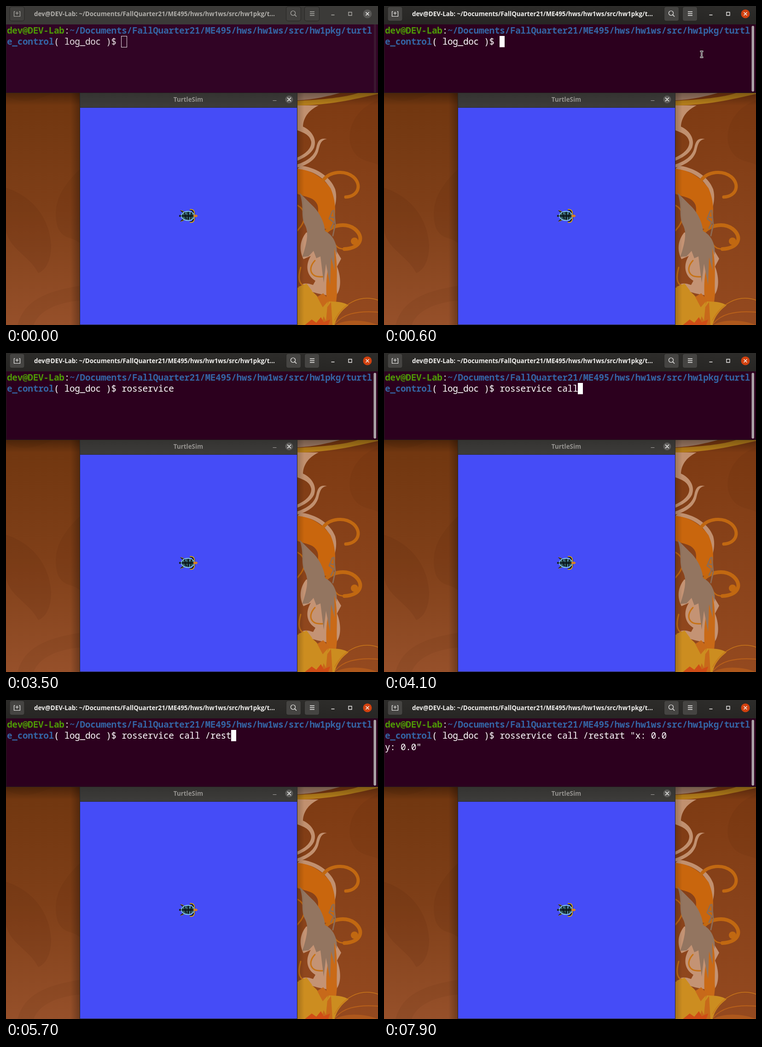
Write an HTML page with a canvas that moves like this. It is 808 px wide and 693 px high and loops after 8000 ms.

```html
<!DOCTYPE html>
<html lang="en">
<head>
<meta charset="utf-8">
<title>Terminal and TurtleSim</title>
<style>
html, body { margin: 0; width: 100%; height: 100%; overflow: hidden; background: #834018; }
canvas { display: block; }
</style>
</head>
<body>
<canvas id="stage" width="808" height="693"></canvas>
<script>
const W = 808, H = 693, LOOP = 8000;
const CELL = 11.33, LINE = 24.4;
const MONO = '"Noto Sans Mono", "DejaVu Sans Mono", monospace';
const TITLE_FONT = 'bold 13.4px "Open Sans", "Noto Sans", sans-serif';
const USER = 'dev@DEV-Lab';
const PATH = '~/Documents/FallQuarter21/ME495/hws/hw1ws/src/hw1pkg/turtl';
const BRANCH = '( log_doc )$ ';
const ctx = document.getElementById('stage').getContext('2d');

// [time, typed text, cursor visible]
const typing = [
  [0, '', 1], [1100, '', 0], [1300, 'ro', 1], [1700, 'ros', 1], [2200, 'ross', 1],
  [2700, 'rosse', 1], [2900, 'rosservice ', 1], [3500, 'rosservice ', 0],
  [3600, 'rosservice ', 1], [3800, 'rosservice ca', 1], [3900, 'rosservice cal', 1],
  [4100, 'rosservice call', 1], [4400, 'rosservice call ', 1], [4600, 'rosservice call /', 1],
  [4900, 'rosservice call /r', 1], [5100, 'rosservice call /re', 1],
  [5500, 'rosservice call /res', 1], [5700, 'rosservice call /rest', 1],
  [6300, 'rosservice call /rest', 0], [6400, 'rosservice call /rest', 1],
  [6800, 'rosservice call /restart ', 1], [7000, 'rosservice call /restart ', 0],
  [7300, 'rosservice call /restart ', 1],
  [7900, 'rosservice call /restart "x: 0.0\ny: 0.0"', 0]
];

// [time, x, y, shape]
const pointer = [
  [0, 0, 0, ''], [300, 793, 242, 'arrow'], [400, 638, 103, 'beam'],
  [600, 690, 105, 'beam'], [1300, 0, 0, '']
];

const at = (steps, t) => steps.reduce((cur, s) => (s[0] <= t ? s : cur));

function box(g, color, x, y, w, h, r = 0) {
  g.fillStyle = color;
  g.beginPath();
  g.roundRect(x, y, w, h, r);
  g.fill();
}

function disc(g, color, x, y, rx, ry = rx) {
  g.fillStyle = color;
  g.beginPath();
  g.ellipse(x, y, rx, ry, 0, 0, 7);
  g.fill();
}

function fill(g, color, d) {
  g.fillStyle = color;
  g.fill(new Path2D(d));
}

function line(g, color, width, d) {
  g.strokeStyle = color;
  g.lineWidth = width;
  g.stroke(new Path2D(d));
}

function fade(g, x0, y0, x1, y1, ...colors) {
  const grad = g.createLinearGradient(x0, y0, x1, y1);
  colors.forEach((c, i) => grad.addColorStop(i / (colors.length - 1), c));
  return grad;
}

function drawWallpaper(g) {
  box(g, fade(g, 0, 189, 0, H, '#70360f', '#7f3f18', '#96502a'), 0, 0, 161, H);
  box(g, fade(g, 0, 189, 0, H, '#7d3a12', '#88421a', '#94491f'), 632, 0, 176, H);

  // faint leaves
  fill(g, 'rgba(70,25,5,.1)', 'M0 395C50 410 95 455 98 520C98 555 85 575 70 580C50 540 0 525 0 480Z');
  fill(g, 'rgba(70,25,5,.09)', 'M160 355C125 390 98 425 112 480C125 510 145 500 160 515Z');
  fill(g, 'rgba(70,25,5,.08)', 'M0 195C35 215 65 205 100 190H0ZM25 693C40 640 85 620 160 608V640C105 645 70 665 60 693Z');
  fill(g, 'rgba(70,25,5,.08)', 'M808 205C765 220 740 260 748 300C760 340 790 335 808 345Z');

  // pale stems
  fill(g, '#a5806a', 'M633 189H725C700 196 670 203 633 205Z');
  fill(g, '#b8801b', 'M633 206C690 203 735 199 765 189H808V191C755 203 700 216 633 216Z');
  fill(g, '#c1906f', 'M633 216H679C660 225 646 240 645 262C665 271 676 290 669 308C662 322 647 330 633 336V329C651 321 664 309 663 295C660 278 642 274 633 270Z');
  fill(g, '#c1906f', 'M697 289C683 291 682 301 678 316C671 337 651 346 633 351V344C654 337 670 326 674 308C677 293 682 286 697 289Z');
  fill(g, '#c1906f', 'M640 347C671 350 704 369 715 398C719 413 717 427 713 440C715 412 703 381 672 365C659 358 645 356 633 354Z');

  // orange plume and curls
  fill(g, '#c9660d', 'M633 354C664 356 690 374 705 396C715 420 718 444 712 475C704 490 689 486 681 474C672 456 684 440 673 426C664 414 648 415 633 408Z');
  g.lineCap = 'round';
  line(g, '#c16811', 7, 'M689 378C704 359 735 356 754 371C773 387 767 413 738 415');
  line(g, '#c16811', 8, 'M690 497C704 475 738 470 757 484C779 501 772 526 735 528');
  line(g, '#c16811', 3, 'M735 528C720 528 716 520 711 513');
  disc(g, '#c16811', 757, 511, 8);
  line(g, '#c16811', 3, 'M633 433C650 442 653 460 641 478L633 488M668 559C656 573 665 590 680 588');

  // lower trunk
  fill(g, '#c49374', 'M652 492C638 510 636 530 646 550L662 543C650 562 652 585 672 597L667 606C651 600 640 602 641 612C662 622 691 629 716 630C730 615 727 585 719 566L728 549L716 529L690 495Z');
  line(g, '#c67216', 3, 'M671 553C655 570 660 591 689 588M650 608C634 606 635 587 640 568');
  fill(g, '#c96a17', 'M711 519C723 552 717 600 719 625L712 693H695C701 650 690 612 700 570Z');
  fill(g, '#937560', 'M637 405L664 432C681 447 692 471 693 489C714 499 721 524 718 541L713 526L714 575L706 546L704 606L695 560L690 601L683 544L674 548L668 532L657 544L644 545C651 520 660 495 649 475C639 455 649 435 637 405Z');
  line(g, '#8c6b55', 3, 'M709 445L702 462L712 470L706 483M712 444L715 475L710 499M704 458L713 460');

  // bottom sweep
  fill(g, '#cc8d20', 'M633 612C655 609 669 621 683 639C700 645 724 638 744 650C729 662 718 674 714 693H633Z');
  fill(g, '#c7691a', 'M689 624L702 639L695 658L706 643L709 693H684L693 664L676 632Z');
  fill(g, '#cc8d20', 'M699 642L695 684L683 660ZM635 610L653 603L665 619L650 631Z');
  fill(g, '#cf4d16', 'M649 693L664 681L674 688L684 676L690 687L704 681L700 693Z');
  line(g, '#c77419', 1.5, 'M714 682C731 649 767 625 808 639');
  line(g, '#b9601a', 2, 'M715 690C731 671 758 661 808 665');
  fill(g, '#ae581c', 'M715 693C735 681 774 680 808 693Z');

  // window shadows
  box(g, fade(g, 161, 0, 140, 0, 'rgba(0,0,0,.28)', 'rgba(0,0,0,0)'), 140, 189, 21, 504);
  box(g, fade(g, 632, 0, 648, 0, 'rgba(0,0,0,.2)', 'rgba(0,0,0,0)'), 632, 189, 16, 504);
  box(g, fade(g, 0, 189, 0, 216, 'rgba(0,0,0,.3)', 'rgba(0,0,0,0)'), 0, 189, W, 27);
}

function drawTurtle(g) {
  g.save();
  g.translate(396, 456);
  for (const side of [-1, 1]) {
    g.save();
    g.scale(1, side);
    fill(g, '#10141e', 'M3 -14C10 -17 17 -9 14 -2L8 -5C11 -9 8 -12 3 -12Z');
    line(g, '#d5a526', 1.8, 'M4 -14C11 -15 14 -10 13 -4');
    fill(g, '#171c22', 'M-18 -12C-12 -12 -8 -10 -8 -6L-12 -5C-13 -8 -15 -9 -18 -12Z');
    line(g, '#b58e27', 1.2, 'M-16 -12C-12 -11 -10 -9 -9 -7');
    g.restore();
  }
  fill(g, '#18232d', 'M-20 -2L-14 -2V2H-20Z');
  disc(g, '#79b9dd', -1, 0, 15, 11);
  disc(g, '#1d3a45', -1, 0, 13, 8.5);
  for (const side of [-1, 1]) {
    for (let i = 0; i < 5; i++) {
      disc(g, i % 2 ? '#5c9bb4' : '#46766a', -10 + i * 4.5, side * (4 + i % 2), 1.6, 2);
    }
  }
  line(g, '#0b1518', 2, 'M-14 0H12M-8 -7L-5 7M0 -8L0 8M7 -7L5 7');
  fill(g, '#d88220', 'M11 -2L17 -3L21 0L17 3L11 2Z');
  g.restore();
}

function closeMark(g, x, y) {
  line(g, '#eeeeec', 1.6, `M${x - 3.5} ${y - 3.5}l7 7m0 -7l-7 7`);
}

function drawSim(g) {
  box(g, '#282725', 160, 189, 473, 504);
  box(g, fade(g, 0, 189, 0, 220, '#343331', '#3d3c3a'), 161, 189, 471, 31);
  box(g, '#454cf7', 161, 221, 471, 471);
  g.font = TITLE_FONT;
  g.textAlign = 'center';
  g.fillStyle = '#93918e';
  g.fillText('TurtleSim', 396, 208);
  g.textAlign = 'left';
  line(g, '#a8a6a3', 1.2, 'M580 205.5H587');
  disc(g, '#5b5a58', 615, 203, 8.5);
  closeMark(g, 615, 203);
  drawTurtle(g);
}

function drawHeader(focused) {
  const ink = focused ? '#f1f0ee' : '#b0aeaa';
  const face = focused ? '#454442' : '#41403e';
  box(ctx, focused ? fade(ctx, 0, 0, 0, 39, '#2d2c2a', '#272624') : '#3b3a38', 0, 0, W, 40);
  for (const x of [8, 608.5, 648.5]) {
    box(ctx, '#262523', x - .5, 1, 33, 32, 5);
    box(ctx, face, x + .5, 2, 31, 30, 4);
  }
  line(ctx, ink, 1.2, 'M20 12H17.5V22.5H30.5V12H28M24 12V19M20.5 15.5H27.5');
  ctx.strokeStyle = ink;
  ctx.beginPath();
  ctx.arc(623.5, 15.5, 5, 0, 7);
  ctx.stroke();
  line(ctx, ink, 1.4, 'M627 19L631 23');
  line(ctx, ink, 1.3, 'M660 12.5H670M660 16.5H670M660 20.5H670');
  line(ctx, ink, 1.3, 'M706.5 19.5H713.5M744 13.5H751V20.5H744Z');
  disc(ctx, focused ? '#d2410f' : '#595856', 785, 17, 9.5);
  closeMark(ctx, 785, 17);
  ctx.font = TITLE_FONT;
  ctx.fillStyle = ink;
  ctx.fillText(`${USER}: ${PATH.slice(0, -4)}…`, 61, 21.5);
}

// Writes on the terminal's character grid and returns the next column.
function put(text, col, row, color, weight = '400') {
  ctx.font = `${weight} 19.4px ${MONO}`;
  ctx.fillStyle = color;
  for (const ch of text) ctx.fillText(ch, 2 + CELL * col++, 60 + LINE * row);
  return col;
}

function drawTerminal(t) {
  const focused = t >= 600;
  const ink = focused ? '#ffffff' : '#e7e1e4';
  box(ctx, '#241a1e', 0, 0, W, 189);
  box(ctx, focused ? '#2c001e' : '#310425', 1, 39, W - 1, 149);
  drawHeader(focused);
  if (focused) box(ctx, '#aaa2a6', 798.5, 43, 5.5, 143, 3);
  else box(ctx, '#3b1730', 799, 40, 5, 148);

  let col = put(USER, 0, 0, '#4e9a06', 'bold');
  col = put(':', col, 0, ink);
  put(PATH, col, 0, '#3465a4', 'bold');
  col = put('e_control', 0, 1, '#3465a4', 'bold');
  col = put(BRANCH, col, 1, ink);

  const [, text, shown] = at(typing, t);
  text.split('\n').forEach((part, i) => { col = put(part, i ? 0 : col, 1 + i, ink); });
  const x = 2 + CELL * col;
  if (!focused) {
    ctx.strokeStyle = ink;
    ctx.lineWidth = 1;
    ctx.strokeRect(250.5, 65.5, 12, 24);
  } else if (shown) {
    box(ctx, '#ffffff', Math.round(x), 65, 11, 24.5);
  }
}

function drawPointer(t) {
  const [, x, y, shape] = at(pointer, t);
  if (!shape) return;
  ctx.save();
  ctx.translate(x, y);
  ctx.lineCap = 'butt';
  if (shape === 'arrow') {
    const d = 'M0 0V16L4 12.5L6.5 18L9 17L6.5 11.5H11.5Z';
    fill(ctx, '#111111', d);
    line(ctx, '#ffffff', 1, d);
  } else {
    const d = 'M-3.5 -6.5H-1L0 -5.5L1 -6.5H3.5M0 -6V6M-3.5 6.5H-1L0 5.5L1 6.5H3.5';
    line(ctx, '#ffffff', 3.2, d);
    line(ctx, '#111111', 1.1, d);
  }
  ctx.restore();
}

const backdrop = document.createElement('canvas');
backdrop.width = W;
backdrop.height = H;
const back = backdrop.getContext('2d');
drawWallpaper(back);
drawSim(back);

function render(now) {
  const t = now % LOOP;
  ctx.drawImage(backdrop, 0, 0);
  drawTerminal(t);
  drawPointer(t);
}

function tick() {
  render(performance.now());
  requestAnimationFrame(tick);
}
tick();
</script>
</body>
</html>
```
